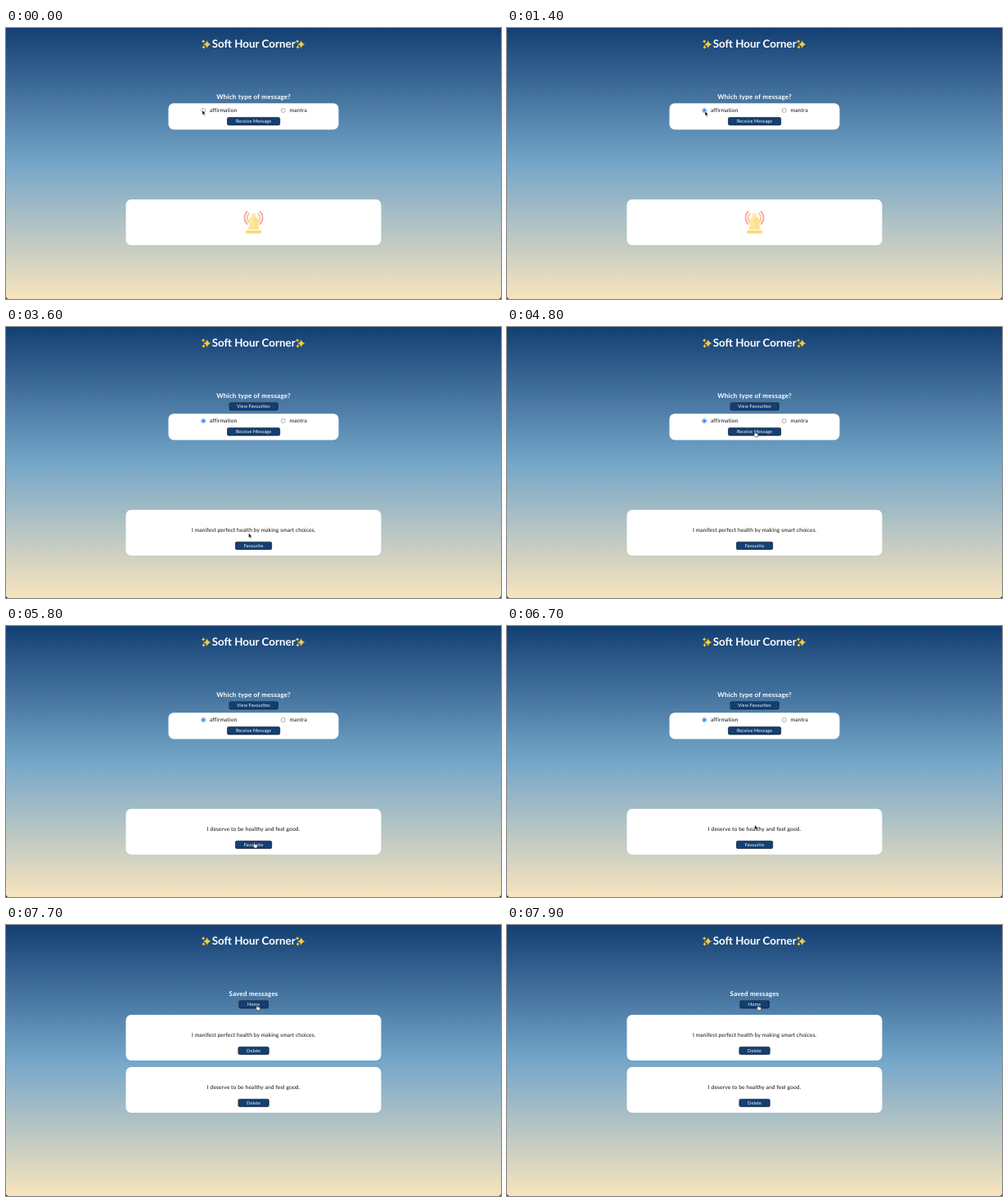
Animation, 605 px wide and 332 px high, one loop 8 s. Source, as an HTML page:

```html
<!DOCTYPE html>
<html lang="en">
<head>
<meta charset="utf-8">
<title>Messages</title>
<style>
  html, body { margin: 0; width: 100%; height: 100%; overflow: hidden; background: #111; }
  svg { display: block; width: 605px; height: 332px; }
  text { font-family: Lato, "Open Sans", sans-serif; font-size: 6.7px; letter-spacing: .1px; fill: #111; text-rendering: geometricPrecision; }
  .mid { text-anchor: middle; }
  .title { font-size: 13.4px; font-weight: 700; letter-spacing: 0; fill: #fff; }
  .head { font-size: 8px; font-weight: 700; letter-spacing: .2px; fill: #fff; }
  .label { font-size: 5.6px; fill: #fff; }
  .panel { fill: #fff; }
  .btn rect { fill: #133f72; stroke: #0b2038; stroke-width: .8; }
  .btn .shine { fill: none; stroke: #4a5560; stroke-width: .5; }
  .btn.down rect { transform: translate(-.8px, -.6px); }
  .btn.down .shine { display: none; }
  .star { fill: #fcc93c; }
</style>
</head>
<body>
<svg id="stage" viewBox="0 0 605 332" xmlns="http://www.w3.org/2000/svg"></svg>
<script>
const LOOP = 8000, STEP = 100;
const stage = document.getElementById('stage');

const text = (x, y, s, cls = 'mid') => `<text class="${cls}" x="${x}" y="${y}">${s}</text>`;
const panel = (x, y, w, h) => `<rect class="panel" x="${x}" y="${y}" width="${w}" height="${h}" rx="6.5"/>`;

// Buttons share a centre line and are sized by width.
const button = (id, y, w, s) => {
  const x = 302.6 - w / 2;
  return `<g class="btn" id="${id}">
    <rect x="${x + .4}" y="${y - 4.6}" width="${w - .8}" height="9.2" rx="1.6"/>
    <path class="shine" d="M${x + .4} ${y + 3.4}V${y - 3}q0-1.6 1.6-1.6H${x + w - 2}"/>
    ${text(302.6, y + 2, s, 'mid label')}</g>`;
};

const star = (x, y, r) => {
  const k = r * .16;
  return `<path class="star" transform="translate(${x} ${y})"
    d="M0 ${-r}Q${k} ${-k} ${r} 0Q${k} ${k} 0 ${r}Q${-k} ${k} ${-r} 0Q${-k} ${-k} 0 ${-r}Z"/>`;
};
const sparkles = x => star(x + 6.8, 20, 5) + star(x + 2.2, 16.4, 2.4) + star(x + 2.6, 23.4, 2.3);

const radio = (id, x) => `<circle id="${id}" cx="${x}" cy="101" r="2.5" fill="#fff" stroke="#767676" stroke-width=".6"/>`;

const wave = (r, color) => [-1, 1].map(s =>
  `<path transform="translate(302.6 232.5) scale(${s} 1)" d="M${r * .72} ${-r * .69}A${r} ${r} 0 0 1 ${r * .72} ${r * .69}"
    fill="none" stroke="${color}" stroke-width="1.9" stroke-linecap="round"/>`).join('');

const bell = `<g id="bell">${wave(11, '#f9a8a0')}${wave(7.8, '#fbc795')}
  <circle cx="302.6" cy="230" r="3" fill="#fdeab0"/>
  <path d="M296.8 246V236.5a5.8 5.8 0 0 1 11.6 0V246Z" fill="#fde8a3"/>
  <path d="M302.6 230.7a5.8 5.8 0 0 1 5.8 5.8V246H302.6Z" fill="#fde08a"/>
  <path d="M296.8 243.5h11.6l1.6 3.5h-14.8Z" fill="#fce39a"/>
  <rect x="293" y="248" width="19.2" height="3.8" rx="1" fill="#fbd978"/></g>`;

const FIRST = 'I manifest perfect health by making smart choices.';
const SECOND = 'I deserve to be healthy and feel good.';

const saved = (y, s) => panel(146.5, y, 312, 56) + text(302.6, y + 26.8, s) + button('', y + 44, 38, 'Delete');

stage.innerHTML = `
  <defs><linearGradient id="sky" x2="0" y2="1">
    <stop stop-color="#133f73"/><stop offset=".5" stop-color="#74a6c9"/><stop offset="1" stop-color="#f8e4be"/>
  </linearGradient></defs>
  <path d="M0 0H605V328.5a3.5 3.5 0 0 1-3.5 3.5H3.5a3.5 3.5 0 0 1-3.5-3.5Z" fill="url(#sky)"/>
  ${sparkles(239)}${sparkles(354)}
  ${text(302.7, 24.2, 'Soft Hour Corner', 'mid title')}
  <g id="home">
    ${text(302.6, 86.7, 'Which type of message?', 'mid head')}
    ${button('view', 97.3, 60, 'View Favourites')}
    <g id="body">
      ${panel(198.5, 92.2, 208, 32.2)}
      ${radio('pick', 241.2)}<circle id="dot" cx="241.2" cy="101" r="1.5" fill="#0b6fe8"/>
      ${text(249, 103.3, 'affirmation', '')}
      ${radio('other', 338.8)}${text(346.6, 103.3, 'mantra', '')}
      ${button('receive', 114.3, 65, 'Receive Message')}
      ${panel(146.5, 210, 312, 56)}
      ${bell}
      <g id="note">${text(302.6, 236.8, FIRST)}${button('fav', 254, 45, 'Favourite')}</g>
    </g>
  </g>
  <g id="list">
    ${text(302.6, 86.7, 'Saved messages', 'mid head')}
    ${button('back', 97.3, 36.5, 'Home')}
    ${saved(110, FIRST)}${saved(174, SECOND)}
  </g>
  <g id="cursor">
    <path id="arrow" d="M0 0V5.6L1.3 4.5 2.2 6.6 3.2 6.2 2.3 4.1H4Z" fill="#000" stroke="#fff" stroke-width=".45"/>
    <path id="hand" d="M.4.5Q1-.3 1.6.5V2.6L4.2 3.1Q5 3.3 4.9 4.3L4.3 7H1.5L-.5 4.5Q-.6 3.5.4 4Z" fill="#fff" stroke="#111" stroke-width=".5"/>
  </g>`;

const el = id => document.getElementById(id);
const show = (id, on) => el(id).setAttribute('display', on ? 'inline' : 'none');
const noteText = el('note').querySelector('text');

// time, x, y of the pointer tip
const path = [
  [0, 240, 100.7], [100, 242, 102], [1600, 242, 102], [2000, 296, 113], [2300, 296, 113],
  [2900, 296.6, 251.2], [3200, 296.6, 251.2], [3300, 296.6, 252.6], [3800, 296.6, 252.6],
  [4200, 300, 145.5], [4400, 300, 145.5], [4800, 302, 127.5], [5200, 302, 127.5],
  [5800, 302.4, 265], [6500, 302.4, 265], [7400, 305.8, 97.6], [8000, 305.8, 97.6]
];

function pointer(t) {
  const i = path.findIndex(p => p[0] > t);
  const [t0, x0, y0] = path[i - 1], [t1, x1, y1] = path[i];
  const u = (t - t0) / (t1 - t0), e = u * u * (3 - 2 * u);
  return [x0 + (x1 - x0) * e, y0 + (y1 - y0) * e];
}

const during = (t, a, b) => t >= a && t < b;
const press = (id, on) => el(id).classList.toggle('down', on);

function draw(t) {
  const picked = t >= 1400, noted = t >= 2200, kept = t >= 3500, listed = t >= 7700;
  const shift = kept ? 14 : 0;

  show('home', !listed);
  show('list', listed);
  show('view', kept);
  show('dot', picked);
  show('bell', !noted);
  show('note', noted);
  el('pick').setAttribute('stroke', picked ? '#0b6fe8' : '#767676');
  el('body').setAttribute('transform', `translate(0 ${shift})`);
  noteText.textContent = t < 5000 ? FIRST : SECOND;

  press('receive', during(t, 2100, 2200) || during(t, 4900, 5000));
  press('fav', during(t, 6300, 6400));
  press('view', during(t, 7500, 7700));

  const [x, y] = pointer(t);
  const over = (cy, w) => Math.abs(y - cy) < 5 && Math.abs(x - 302.6) < w / 2;
  const hand = listed ? over(97.3, 36.5)
    : over(114.3 + shift, 65) || (noted && over(254 + shift, 45)) || (kept && over(97.3, 60));
  show('hand', hand);
  show('arrow', !hand);
  el('cursor').setAttribute('transform', `translate(${x} ${y})`);
}

let last = -1;
function tick() {
  const t = Math.floor(performance.now() % LOOP / STEP) * STEP;
  if (t !== last) draw(last = t);
  requestAnimationFrame(tick);
}
tick();
</script>
</body>
</html>
```
